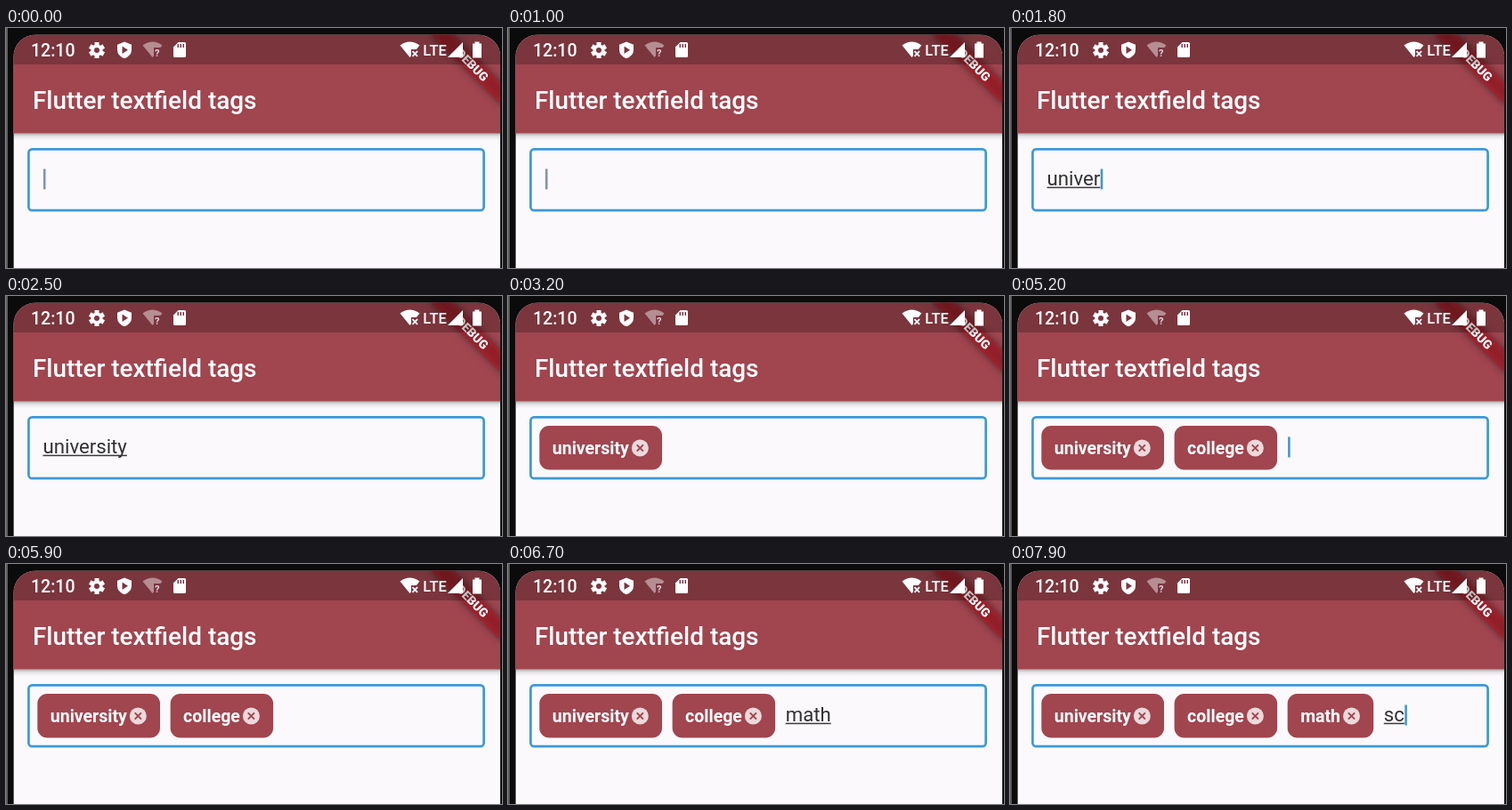
Animation, 557 px wide and 270 px high, one loop 8 s. Source, as an HTML page with a canvas:

```html
<!DOCTYPE html>
<html lang="en">
<head>
<meta charset="utf-8">
<title>Flutter textfield tags</title>
<style>
  html, body { margin: 0; height: 100%; overflow: hidden; background: #0b0b0b; }
  canvas { display: block; }
</style>
</head>
<body>
<canvas id="stage" width="557" height="270"></canvas>
<script>
const ctx = document.getElementById('stage').getContext('2d');
const LOOP = 8000, BLINK = 250;
const RED = '#a1454f', STATUS = '#7b3541', PAPER = '#fbf9fb', BLUE = '#3b99d9';
const SCREEN = { x: 8.4, y: 7.5, w: 546.8 };
const font = (weight, size) => `${weight} ${size}px Roboto, sans-serif`;
const INPUT_FONT = font(400, 22.2), TAG_FONT = font(700, 19.5);

// Start time, delay per key, keys; a newline turns the text into a tag.
const typing = [
  [1020, 135, 'university'], [2900, 0, '\n'],
  [3780, 140, 'co'], [4260, 150, 'llege'], [5100, 0, '\n'],
  [6000, 135, 'math'], [7050, 0, '\n'],
  [7550, 200, 'sc'],
];
const keys = typing.flatMap(([start, step, text]) =>
  [...text].map((key, i) => ({ at: start + i * step, key })));

function stateAt(time) {
  const state = { tags: [], text: '', lastKey: 0 };
  for (const { at, key } of keys) {
    if (at > time) break;
    state.lastKey = at;
    if (key === '\n') {
      state.tags.push(state.text);
      state.text = '';
    } else state.text += key;
  }
  return state;
}

function rect(x, y, w, h, color) {
  ctx.fillStyle = color;
  ctx.fillRect(x, y, w, h);
}

function rounded(x, y, w, h, radius) {
  ctx.beginPath();
  ctx.roundRect(x, y, w, h, radius);
}

function disc(x, y, r, color) {
  ctx.fillStyle = color;
  ctx.beginPath();
  ctx.arc(x, y, r, 0, 7);
  ctx.fill();
}

function label(text, x, y, textFont, color = '#fff') {
  ctx.font = textFont;
  ctx.fillStyle = color;
  ctx.fillText(text, x, y);
  return ctx.measureText(text).width;
}

function shape(path, color = '#fff') {
  ctx.fillStyle = color;
  ctx.fill(new Path2D(path));
}

function cross(x, y, r, width, color) {
  ctx.strokeStyle = color;
  ctx.lineWidth = width;
  ctx.stroke(new Path2D(`M${x - r} ${y - r}l${2 * r} ${2 * r}m0 ${-2 * r}l${-2 * r} ${2 * r}`));
}

function wifi(x, color) {
  shape(`M${x} 33L${x - 11} 19.5Q${x} 11.5 ${x + 11} 19.5Z`, color);
}

function gear(x, y) {
  ctx.save();
  ctx.translate(x, y);
  for (let i = 0; i < 3; i++) {
    rect(-2.5, -9, 5, 18, '#fff');
    ctx.rotate(Math.PI / 3);
  }
  ctx.restore();
  disc(x, y, 6.6, '#fff');
  disc(x, y, 3, STATUS);
}

// The system draws its bar as a translucent layer above the app.
function statusBar() {
  rect(SCREEN.x, SCREEN.y, SCREEN.w, 41 - SCREEN.y, 'rgba(0,0,0,.24)');
  label('12:10', 28, 32, font(500, 19.5));
  gear(102, 25);
  shape('M133 15.5l8 3.3v5.4q0 7-8 10q-8-3-8-10v-5.4z');
  shape('M130.5 20.5v8.5l6.5-4.2z', STATUS);

  wifi(164.5, '#ffffff70');
  rect(166, 22, 9, 12, STATUS);
  label('?', 167, 32, font(700, 11), '#e5d5d8');

  shape('M193.5 16h7q1.5 0 1.5 1.5v14q0 1.5-1.5 1.5h-11q-1.5 0-1.5-1.5v-10z');
  for (const x of [192.5, 195.5, 198.5]) rect(x, 18, 1.5, 4, STATUS);

  wifi(453.5, '#fff');
  rect(455, 24, 9, 10, STATUS);
  cross(459.3, 29, 2.8, 1.8, '#fff');
  label('LTE', 468.3, 30.5, font(500, 16.5));
  shape('M513 16v17h-17z');
  shape('M526.5 15.5h5v2h2.5v16h-10v-16h2.5z');
}

function appBar() {
  const bottom = 118.5;
  rect(SCREEN.x, SCREEN.y, SCREEN.w, bottom - SCREEN.y, RED);
  const shadow = ctx.createLinearGradient(0, bottom, 0, bottom + 8);
  shadow.addColorStop(0, 'rgba(0,0,0,.3)');
  shadow.addColorStop(.4, 'rgba(0,0,0,.09)');
  shadow.addColorStop(1, 'rgba(0,0,0,0)');
  rect(SCREEN.x, bottom, SCREEN.w, 8, shadow);
  label('Flutter textfield tags', 30, 90.6, font(500, 27.9));
}

function debugBanner() {
  ctx.save();
  ctx.translate(523, 40.8);
  ctx.rotate(Math.PI / 4);
  ctx.shadowColor = 'rgba(0,0,0,.8)';
  ctx.shadowBlur = 8;
  rect(-56, -8.4, 112, 16.8, 'rgba(183,28,40,.63)');
  ctx.shadowColor = 'transparent';
  ctx.textAlign = 'center';
  label('DEBUG', 1.2, 5, font(900, 13.8));
  ctx.restore();
}

function tag(text, x) {
  ctx.font = TAG_FONT;
  const textWidth = ctx.measureText(text).width, width = textWidth + 51.7;
  rounded(x, 146, width, 49.5, 11);
  ctx.fillStyle = RED;
  ctx.fill();
  label(text, x + 14.5, 178, TAG_FONT);
  const closeX = x + textWidth + 27;
  disc(closeX, 171, 9.5, '#ecd9db');
  cross(closeX, 171, 3.6, 2, RED);
  return width;
}

function field(time) {
  const { tags, text, lastKey } = stateAt(time);
  rounded(25.4, 136.4, 511.2, 68.8, 4);
  ctx.strokeStyle = BLUE;
  ctx.lineWidth = 2.7;
  ctx.stroke();

  let x = 35.3;
  for (const word of tags) x += tag(word, x) + 11.6;
  if (!tags.length) x += 6.2;
  const width = label(text, x, 176.5, INPUT_FONT, '#303032');
  if (text) rect(x, 178.7, width, 1.5, '#39393b');

  const visible = Math.floor((time - lastKey) / BLINK) % 2 === 0;
  if (visible) rect(x + width + .4, 158.5, 2.6, 23, lastKey ? '#4a95cf' : '#7f93ba');
}

function draw() {
  const time = performance.now() % LOOP;
  rect(0, 0, 557, 270, '#0b0b0b');
  rect(0, 0, 2, 270, '#5c5c5c');
  ctx.save();
  rounded(SCREEN.x, SCREEN.y, SCREEN.w, 300, 25);
  ctx.clip();
  rect(SCREEN.x, SCREEN.y, SCREEN.w, 270, PAPER);
  appBar();
  field(time);
  debugBanner();
  statusBar();
  ctx.restore();
  requestAnimationFrame(draw);
}
draw();
</script>
</body>
</html>
```
